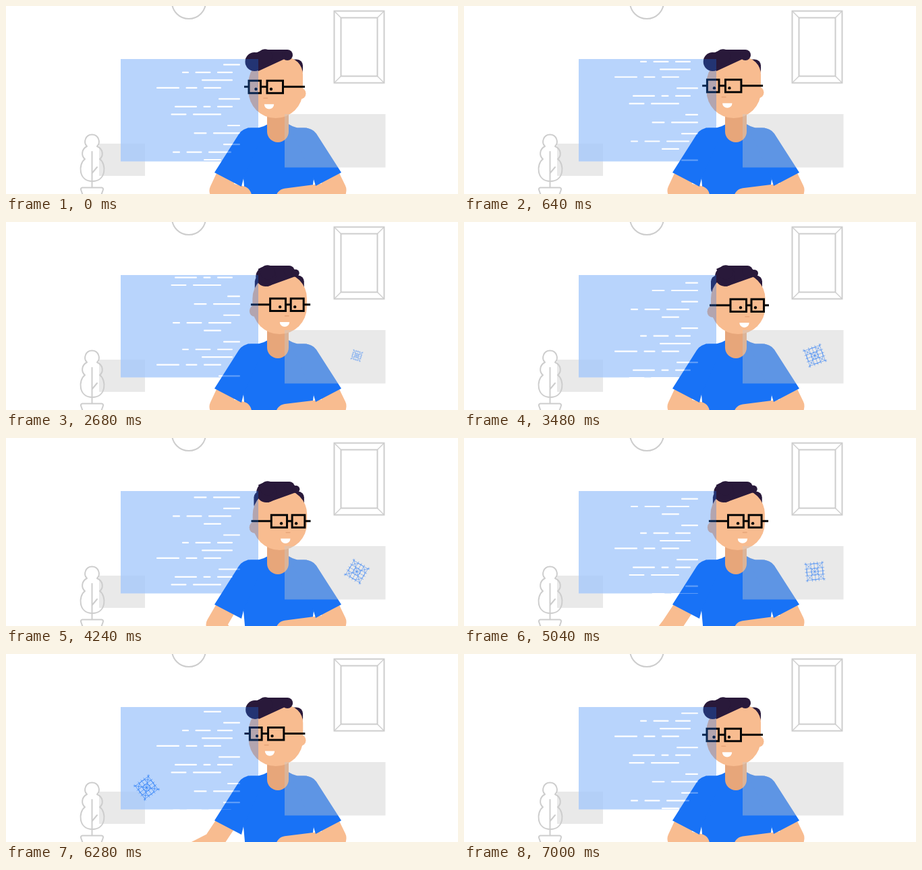
These frames come from a looping animation (670 by 280 pixels, 7040 ms). An HTML page with a canvas:

```html
<!DOCTYPE html>
<html lang="en">
<head>
<meta charset="utf-8">
<title>Desk scene</title>
<style>
html, body { margin: 0; width: 100%; height: 100%; overflow: hidden; background: #fff; }
canvas { display: block; }
</style>
</head>
<body>
<canvas id="stage" width="670" height="280"></canvas>
<script>
const ctx = document.getElementById('stage').getContext('2d');
const LOOP = 7040;
const SKIN = '#f8bc90', SHADE = '#e7a67a', BLUE = '#1872f6', HAIR = '#29193a';
const INK = '#060606', LINE = '#cdcdcd', GLASS = 'rgba(200,200,200,.4)';
const PANEL = { x: 170, y: 79, w: 204, h: 152.5 };

// Dash widths of the code lines by paragraph; each line starts with its right edge.
const CODE = [
  [[347, 25], [336, 10, 23, 23], [336, 46], [319, 34, 17, 26]],
  [[347, 32], [336, 33, 11, 23], [319, 23, 42]],
  [[347, 19], [347, 19, 40]],
  [[347, 25], [334, 11, 23, 34], [319, 26]]
];
const LINE_STEP = 11.45, PARAGRAPH_GAP = 5.2, DASH_GAP = 9.5;
const PERIOD = LINE_STEP * CODE.flat().length + PARAGRAPH_GAP * CODE.length;

const layer = document.createElement('canvas');
layer.width = PANEL.w;
layer.height = Math.ceil(PANEL.h);
const pc = layer.getContext('2d');

const mix = (a, b, k) => a + (b - a) * k;

// Eased 0 to 1 between two times.
function ramp(t, from, to) {
  const k = Math.min(1, Math.max(0, (t - from) / (to - from)));
  return k * k * (3 - 2 * k);
}

function disc(x, y, rx, color, ry = rx) {
  ctx.fillStyle = color;
  ctx.beginPath();
  ctx.ellipse(x, y, rx, ry, 0, 0, Math.PI * 2);
  ctx.fill();
}

function box(x, y, w, h, radii, color) {
  ctx.fillStyle = color;
  ctx.beginPath();
  ctx.roundRect(x, y, w, h, radii);
  ctx.fill();
}

function shape(path, color) {
  ctx.fillStyle = color;
  ctx.fill(new Path2D(path));
}

function line(path, width, color, cap = 'round') {
  ctx.strokeStyle = color;
  ctx.lineWidth = width;
  ctx.lineCap = cap;
  ctx.lineJoin = cap === 'round' ? 'round' : 'miter';
  ctx.stroke(new Path2D(path));
}

function room() {
  box(138, 205, 68, 48, 0, GLASS);
  box(PANEL.x, PANEL.y, PANEL.w, PANEL.h, 0, 'rgba(255,255,255,.7)');
  line('M246 -6A25 25 0 0 0 296 -6', 2, LINE);
  line('M486.500 7.500h74v107h-74ZM496.500 17.500h54v87h-54Z', 2, LINE, 'butt');
  line('M487 8l9 9M560 8l-9 9M487 114l9 -9M560 114l-9 -9', 1.4, LINE);
  line('M120 209C114 203 118 191.500 127.500 191.500C137 191.500 141 203 135 209' +
    'C144 213 145 223 139 228C149 235 149 261 128 261C107 261 107 235 117 228C111 223 112 213 120 209Z', 2, LINE);
  line('M127.500 217V270M127.500 249L135 240', 2, LINE);
  line('M114 282L111.500 275Q110 271 113 270.500H142Q145 271 143.500 275L141 282', 2, LINE);
}

function body(t) {
  const nod = Math.sin(t / LOOP * Math.PI * 20) * .7;
  const reach = ramp(t, 3620, 4800) - ramp(t, 6300, 6900);
  const degrees = 14 + 113 * ramp(t, 3620, 5040) + 31 * ramp(t, 5080, 5760) - 144 * ramp(t, 6200, 6900);
  const angle = degrees * Math.PI / 180;
  const length = mix(33.5, 60, reach);
  const ex = mix(316.5, 307.5, reach), ey = mix(275, 280, reach);
  const hx = ex + length * Math.cos(angle), hy = ey + length * Math.sin(angle) + nod * (1 - reach);

  shape('M352 257L358 181.500H374Q382 180 388 176H419Q425 180 432 181.500H446L456 258L452 290H355Z', BLUE);
  line(`M330 246L${ex} ${ey}L${hx} ${hy}`, 30, SKIN);
  line(`M476 246L489.500 274L489 277L415 ${286.5 + nod}`, 30, SKIN);
  shape('M309 248L345 191Q351 181.500 363 181.500H385L352 257L349 269Z', BLUE);
  shape('M497 248L460 190Q454 181.500 442 181.500H422L456 258L459 268Z', BLUE);
  box(387, 145, 32, 58, [0, 0, 16, 16], SHADE);
}

function head(t) {
  // 0 looks left, 1 looks right.
  const turn = .05 * ramp(t, 0, 2000) + .95 * ramp(t, 2200, 2800) - .1 * ramp(t, 3480, 5040) -
    .83 * ramp(t, 5080, 5620) - .07 * ramp(t, 5760, 6900);
  const lift = 7 * (ramp(t, 0, 2000) - ramp(t, 2200, 2800)) + 3 * (ramp(t, 5080, 5620) - ramp(t, 5760, 7000));
  const at = (a, b) => mix(a, b, turn);
  const y = at(120.3, 124) - lift;

  const back = at(395, 366);
  box(back, 79.5, at(440, 442) - back, at(25, 29), 9, HAIR);
  disc(436.5, y + 10, 8, SKIN, 8.5);
  disc(at(372, 368), y + 9.5, 7.5, SKIN, 8.5);
  box(at(359.5, 366), 76, 80.5, 91, [38, at(26, 38), 40, 40], SKIN);

  const tuft = at(368.5, 387), tip = at(417, 420);
  shape(`M${at(370, 374)} 70L${at(381, 385)} 65H${tip}L${at(425, 433)} 74L${at(417, 434)} ${at(77, 80)}` +
    `L${at(374, 389)} ${at(97, 96)}Z`, HAIR);
  disc(tuft, at(83, 81), at(14, 15), HAIR);
  disc(at(384, 388), 75, 10.7, HAIR);
  disc(tip, 73, 8, HAIR);
  disc(at(418, 430.5), at(72, 76.5), 5.5, HAIR);

  const l0 = at(360, 395), l1 = at(377.5, 418.5), r0 = at(387, 426), r1 = at(410.5, 444.5);
  for (const [a, b] of [[l0, l1], [r0, r1]]) line(`M${a} ${y - 9}H${b}v18.500H${a}Z`, 3, INK, 'butt');
  line(`M${at(353, 364)} ${y}H${l0}M${l1} ${y}H${r0}M${r1} ${y}H${at(443, 452)}`, 3, INK, 'butt');
  disc(at(370.5, 410), y + 3.5, 2.2, INK);
  disc(at(393, 432), y + 3.5, 2.2, INK);
  line(`M${at(382, 417)} ${y + 17}h5.500`, 1.6, SHADE);
  shape(`M${at(382.8, 408.3)} ${y + 26}h14.400a7.200 7.200 0 0 1 -14.400 0Z`, '#fff');
}

// Scroll distance: brisk at first, a slower spell, then steady to the end.
function scroll(t) {
  const stops = [[0, 0], [3480, 87.5], [5040, 115.6], [5760, 133], [LOOP, PERIOD]];
  const i = stops.findIndex(s => t < s[0]);
  const [t0, d0] = stops[i - 1], [t1, d1] = stops[i];
  return mix(d0, d1, (t - t0) / (t1 - t0));
}

function codeLine([right, ...dashes], y) {
  let x = right - PANEL.x;
  for (const w of dashes.reverse()) {
    pc.beginPath();
    pc.roundRect(x - w, y - 1.1, w, 2.2, 1);
    pc.fill();
    x -= w + DASH_GAP;
  }
}

function codePanel(t) {
  pc.clearRect(0, 0, layer.width, layer.height);
  pc.fillStyle = BLUE;
  pc.fillRect(0, 0, PANEL.w, PANEL.h);
  pc.fillStyle = '#fff';
  let y = 8.5 - scroll(t);
  while (y < PANEL.h) {
    for (const paragraph of CODE) {
      for (const row of paragraph) {
        codeLine(row, y);
        y += LINE_STEP;
      }
      y += PARAGRAPH_GAP;
    }
  }
  pc.clearRect(0, PANEL.h, PANEL.w, 1);
  ctx.globalAlpha = .3;
  ctx.drawImage(layer, PANEL.x, PANEL.y);
  ctx.globalAlpha = 1;
}

function lattice(x, y, degrees, size, alpha) {
  if (size <= 0 || alpha <= 0) return;
  ctx.save();
  ctx.translate(x, y);
  ctx.rotate(degrees * Math.PI / 180);
  ctx.scale(size, size);
  ctx.globalAlpha = alpha;
  let path = 'M-14 -14L14 14M14 -14L-14 14';
  for (const p of [-12, -5, 0, 5, 12]) path += `M${p} -14.500V14.500M-14.500 ${p}H14.500`;
  for (const r of [5, 12]) path += `M${-r} 0a${r} ${r} 0 1 0 ${2 * r} 0a${r} ${r} 0 1 0 ${-2 * r} 0`;
  line(path, .7, BLUE, 'butt');
  ctx.restore();
}

function draw(t) {
  ctx.fillStyle = '#fff';
  ctx.fillRect(0, 0, 670, 280);
  room();
  body(t);
  head(t);
  codePanel(t);
  box(413, 161, 149.5, 79.5, 0, GLASS);

  lattice(520, 199, (t - 3780) / 15, ramp(t, 2480, 2860) - ramp(t, 5080, 5320), .6);
  const drift = ramp(t, 5760, 6480);
  lattice(219 - 13 * drift, 199, -45 * drift, ramp(t, 5300, 5600), .75 * (1 - ramp(t, 6500, 6940)));
}

const start = performance.now();
function tick(now) {
  draw(Math.max(0, now - start) % LOOP);
  requestAnimationFrame(tick);
}
draw(0);
requestAnimationFrame(tick);
</script>
</body>
</html>
```
